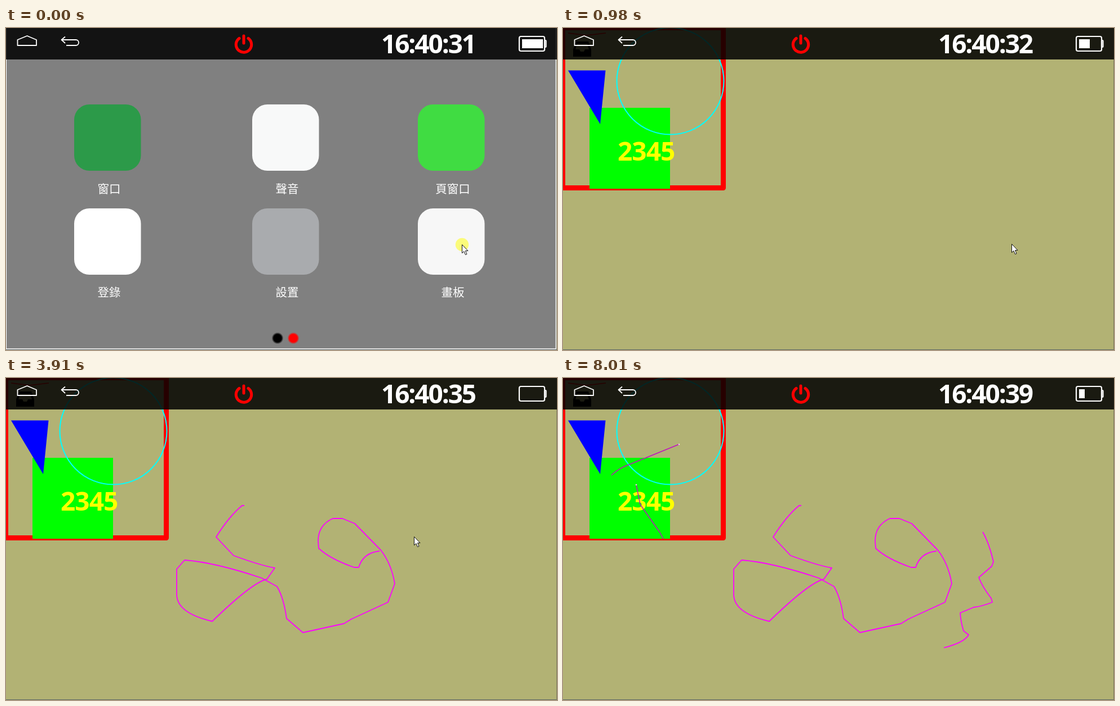
Write an HTML page with a canvas that moves like this. It is 978 by 573 pixels and loops after 8.27 s.

```html
<!DOCTYPE html>
<html lang="zh-Hant">
<head>
<meta charset="utf-8">
<style>
  html, body { margin: 0; width: 100%; height: 100%; overflow: hidden; background: #808080; }
  canvas { display: block; }
</style>
</head>
<body>
<canvas id="stage" width="978" height="573"></canvas>
<script>
const W = 978, H = 573, LOOP = 8270, STEP = 163.4, LAST_STEP = 49;
const INK_LAG = 0.57, GLIDE = 3;
const ctx = document.getElementById('stage').getContext('2d');
const DIGITS = 'bold 46px "Open Sans", "Noto Sans", sans-serif';
const CJK = '20.5px "Noto Sans CJK TC", "Noto Sans CJK", sans-serif';

const tiles = [
  ['#2c9a49', '窗口'], ['#f8f9f9', '聲音'], ['#40dc42', '頁窗口'],
  ['#ffffff', '登錄'], ['#a9abae', '設置'], ['#f7f7f7', '畫板']
];

// Pointer moves at an even pace along each path; start and end are in steps.
function gesture(start, end, d, ink, width) {
  const guide = document.createElementNS('http://www.w3.org/2000/svg', 'path');
  guide.setAttribute('d', d);
  const length = guide.getTotalLength();
  const reached = k => length * clamp((k - start) / (end - start));
  const at = k => guide.getPointAtLength(reached(k));
  return { start, end, ink, width, reached, at, path: new Path2D(d), pressed: true };
}

const swipe = gesture(0, 2.855, 'M810 386L797 385');
const loops = gesture(10, 22.8, `M423 227H419Q396 246 373 283L404 316Q450 333 477 338L463 358
  Q437 364 366 433Q303 418 303 385V340L317 324Q371 328 454 356L481 371Q493 391 498 428L527 453
  L600 437L613 429L678 399L690 366Q684 330 665 306L619 259L597 250H580Q554 262 554 290L555 303
  Q575 322 618 337H626Q634 311 663 308`, '#f0f', 1.8);
const zigzag = gesture(24.4, 30, `M745 274Q756 293 764 327L761 335L738 355Q744 371 760 392L762 399
  Q745 406 729 408L705 418Q706 434 711 450L720 457Q712 471 676 480`, '#f0f', 1.8);
const down = gesture(33.4, 34.1, 'M130 190L137 225L172 275L178 286', '#c010c0', 1.4);
const across = gesture(37, 40, 'M206 118L115 155Q100 160 86 173', '#c010c0', 1.4);
const leave = gesture(42, 44, 'M626 462L650 600');
leave.pressed = false;
const gestures = [swipe, loops, zigzag, down, across, leave];

function clamp(v) { return Math.min(Math.max(v, 0), 1); }
function mix(a, b, p) { return a + (b - a) * p; }

function pointer(k) {
  const i = gestures.findLastIndex(g => g.start <= k);
  const now = gestures[i], next = gestures[i + 1];
  const from = now.at(k);
  if (k <= now.end || !next) return { x: from.x, y: from.y, pressed: now.pressed && k <= now.end };
  const to = next.at(next.start);
  const p = clamp(1 - (next.start - k) / Math.min(next.start - now.end, GLIDE));
  return { x: mix(from.x, to.x, p), y: mix(from.y, to.y, p), pressed: false };
}

function scrollAt(k) {
  const drag = 810 - swipe.at(k).x;
  const p = clamp((k - swipe.end) / (6 - swipe.end));
  return Math.round(mix(drag, W, (1 - Math.cos(Math.PI * p)) / 2));
}

function fillRect(color, x, y, w, h) {
  ctx.fillStyle = color;
  ctx.fillRect(x, y, w, h);
}

function fillPath(color, d) {
  ctx.fillStyle = color;
  ctx.fill(new Path2D(d));
}

function strokePath(color, width, path) {
  ctx.strokeStyle = color;
  ctx.lineWidth = width;
  ctx.lineJoin = 'round';
  ctx.stroke(typeof path === 'string' ? new Path2D(path) : path);
}

function circle(x, y, r) {
  const path = new Path2D();
  path.arc(x, y, r, 0, 7);
  return path;
}

function roundRect(x, y, w, h, r) {
  const path = new Path2D();
  path.roundRect(x, y, w, h, r);
  return path;
}

function fillCircle(color, x, y, r) {
  ctx.fillStyle = color;
  ctx.fill(circle(x, y, r));
}

function label(text, x, y, font, color, align, spacing = 0) {
  ctx.font = font;
  ctx.fillStyle = color;
  ctx.textAlign = align;
  ctx.letterSpacing = spacing + 'px';
  ctx.fillText(text, x, y);
}

function softDot(x, rgb) {
  const g = ctx.createRadialGradient(x, 552, 7, x, 552, 10.5);
  g.addColorStop(0, `rgb(${rgb})`);
  g.addColorStop(1, `rgba(${rgb},0)`);
  fillCircle(g, x, 552, 10.5);
}

function drawMenu() {
  fillRect('#808080', 0, 0, W, H);
  tiles.forEach(([color, text], i) => {
    const x = [121, 437, 731][i % 3], row = Math.floor(i / 3);
    ctx.fillStyle = color;
    ctx.fill(roundRect(x, 136 + 185 * row, 118.5, 118, 27));
    label(text, x + 62, 294 + 184 * row, CJK, '#fff', 'center');
  });
  softDot(482, '0,0,0');
  softDot(510, '255,0,0');
  strokePath('#fff', 1.5, roundRect(0.3, -2, 976, 573, 0));
}

function drawInk(g, k) {
  if (!g.ink || k < g.start) return;
  ctx.setLineDash([g.reached(k > g.end ? k : k - INK_LAG), LOOP]);
  strokePath(g.ink, g.width, g.path);
  ctx.setLineDash([]);
  if (g.width < 1.5) {
    const { x, y } = g.at(g.start);
    fillCircle('#f4c8f0', x, y, 1.3);
  }
}

function drawBoard(k) {
  fillRect('#b2b274', 0, 0, W, H);
  strokePath('#f00', 9, 'M-.5-.5h285v285h-285z');
  strokePath('#f00', 1.5, 'M9 9L42 13L76 9');
  fillPath('#000', 'M23 24H45L50 38V51H18V38z');
  fillPath('#b2b274', 'M25 28H43L46 38H39L37 42H31L29 38H22z');
  fillRect('#0f0', 47, 142, 143, 144);
  fillPath('#00f', 'M9 75.5H75.5L66 171z');
  strokePath('#0ff', 2, circle(190.5, 94.5, 95));
  label('2345', 97, 236, DIGITS, '#ff0', 'left', -0.9);
  gestures.forEach(g => drawInk(g, k));
}

function drawBattery(level) {
  strokePath('#fff', 2.2, roundRect(911, 15, 45, 26, 3));
  strokePath('#fff', 2.2, roundRect(956, 22, 2.5, 12, 1));
  if (level) fillRect('#fff', 916, 20, 1 + 9 * level, 16);
}

function drawBar(k) {
  fillRect('rgba(0,0,0,0.85)', 0, 0, W, 56);
  strokePath('#fff', 1.8, 'M20.5 31V21L37.5 14L54 21V31z');
  strokePath('#fff', 1.8, 'M105 15.5L98.5 21L105 27M99 21H124a5 5 0 0 1 0 10H107');

  const power = new Path2D();
  power.arc(422, 29.5, 13.7, -0.95, Math.PI + 0.95);
  power.moveTo(422, 14);
  power.lineTo(422, 27);
  ctx.lineCap = 'round';
  strokePath('#f00', 5, power);
  ctx.lineCap = 'butt';

  const time = k * STEP;
  const second = 31 + Math.floor((time + 110) / 1000);
  label('16:40:' + second, 666, 45, DIGITS, '#fff', 'left', -2.1);
  drawBattery(Math.floor(4.33 + time / 364) % 5);
}

function drawPointer(k) {
  const { x, y, pressed } = pointer(k);
  if (pressed) fillCircle('rgba(255,255,0,0.5)', x - 0.5, y - 0.5, 11.7);
  const arrow = 'M0 0V15L3.5 12L6 18L8.5 17L6 11H10.5z';
  ctx.save();
  ctx.translate(Math.round(x) - 0.5, Math.round(y) - 0.5);
  fillPath('#fff', arrow);
  strokePath('#111', 1, arrow);
  ctx.restore();
}

function drawAt(x, draw) {
  ctx.save();
  ctx.translate(x, 0);
  ctx.beginPath();
  ctx.rect(0, 0, W, H);
  ctx.clip();
  draw();
  ctx.restore();
}

function render(now) {
  const k = Math.min(Math.floor((now % LOOP + 12) / STEP), LAST_STEP);
  const scroll = scrollAt(k);
  drawAt(-scroll, drawMenu);
  drawAt(W - scroll, () => drawBoard(k));
  drawBar(k);
  fillRect('#5a6464', 0, H - 1, W, 1);
  fillRect('#77775a', W - 1, 56, 1, H - 56);
  drawPointer(k);
  requestAnimationFrame(render);
}
requestAnimationFrame(render);
</script>
</body>
</html>
```
